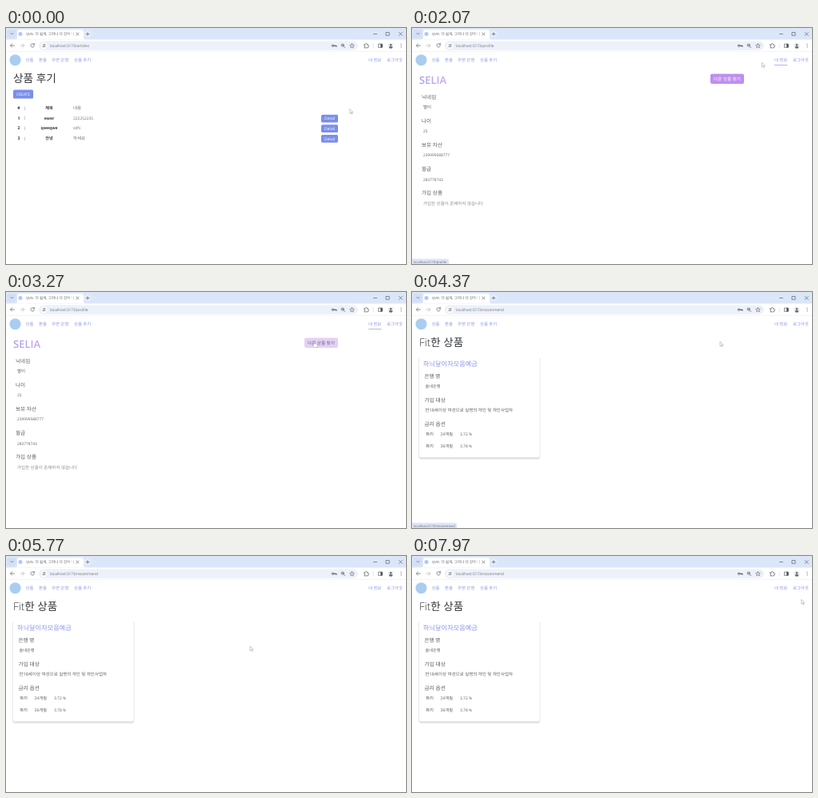
These frames come from a looping animation (500x296 px, 8000 ms). An HTML page:

```html
<!DOCTYPE html>
<html>
<head>
<meta charset="utf-8">
<style>
  html, body { margin: 0; width: 100%; height: 100%; overflow: hidden; background: #fff; }
  svg { display: block; width: 500px; height: 296px; }
  text { font-family: "Open Sans", "Noto Sans CJK KR", "Noto Sans CJK", sans-serif; text-rendering: geometricPrecision; white-space: pre; }
  .line { fill: none; stroke: #5d6268; stroke-width: .7; stroke-linecap: round; stroke-linejoin: round; }
</style>
</head>
<body>
<svg viewBox="0 0 500 296">
  <defs>
    <linearGradient id="nameFill"><stop stop-color="#ada1e7"/><stop offset="1" stop-color="#caa9ee"/></linearGradient>
    <linearGradient id="tabFade"><stop stop-color="#fff" stop-opacity="0"/><stop offset="1" stop-color="#fff"/></linearGradient>
  </defs>

  <g id="browser">
    <rect width="500" height="14.5" fill="#dce6f9"/>
    <rect x="1.5" y="2" width="11" height="10.5" rx="3" fill="#d3dff5"/>
    <path d="M11 14.5q3 0 3-3V5q0-3 3-3H94q3 0 3 3v6.500q0 3 3 3z" fill="#fff"/>
    <circle cx="18" cy="7.500" r="2.500" fill="#a9cdf0"/>
    <circle cx="102" cy="7.500" r="4.500" fill="#e6eefb"/>
    <g id="tabTitle"></g>
    <rect x="77" y="3" width="7" height="10" fill="url(#tabFade)"/>
    <path class="line" d="M6 6.500l1.500 1.500l1.500-1.500M87.900 6l3 3m0-3l-3 3M100 7.500h4m-2-2v4M459.500 7.500h4M475.300 5.500h3.800v3.800h-3.800zM491.300 5.500l4 4m0-4l-4 4"/>
    <rect x="41" y="16.500" width="399" height="11.500" rx="5.700" fill="#edf1fa"/>
    <path class="line" d="M10.500 22h-5m2.200-2.200l-2.200 2.200l2.200 2.200M35.200 20.600a2.300 2.300 0 1 0 .2 2M35.400 19.300v1.700h-1.700"/>
    <path class="line" style="stroke:#b3b7bc" d="M17.800 22h5m-2.200-2.200l2.200 2.200l-2.200 2.200"/>
    <circle cx="47.500" cy="22.200" r="3.700" fill="#fff"/>
    <path class="line" style="stroke-width:.5" d="M45.600 21.100h1.500m1.300 0h1.200M45.600 23.300h.9m1.400 0h1.700"/>
    <circle cx="47.800" cy="21.100" r=".6" class="line" style="stroke-width:.5"/>
    <circle cx="47" cy="23.300" r=".6" class="line" style="stroke-width:.5"/>
    <circle cx="408.600" cy="22.200" r="1.200" class="line" style="stroke-width:1"/>
    <path class="line" style="stroke-width:1" d="M410 22.200h3.200v1.100m-1.500-1v.7"/>
    <circle cx="420.800" cy="21.600" r="1.700" class="line"/>
    <path class="line" d="M422.100 23l1.700 1.700M420 21.600h1.600"/>
    <path class="line" style="stroke-width:.6" d="M432.500 19.500l.8 1.800l2 .2l-1.500 1.300l.5 2l-1.800-1.100l-1.800 1.100l.5-2l-1.500-1.300l2-.2z"/>
    <path class="line" d="M448 20.600h1.500q0-1.300.8-1.300t.8 1.300h1.400v1.500q1.200 0 1.200.7t-1.200.7v1.400h-4.500v-1.400q1 0 1-.7t-1-.7z"/>
    <path d="M459 19v6.500" stroke="#d3e0f7" stroke-width=".7"/>
    <path class="line" d="M465.800 20h4.600v4.400h-4.600z"/>
    <path d="M468.200 20h2.200v4.400h-2.200z" fill="#4c5157"/>
    <circle cx="481" cy="22.200" r="3.600" fill="#eaebec"/>
    <path d="M478.600 24.800q.4-2 2.400-2t2.400 2q-2.400 1.800-4.800 0z" fill="#6b6e72"/>
    <circle cx="481" cy="21.200" r="1.300" fill="#6b6e72"/>
    <path d="M494 20v.1m0 1.900v.1m0 1.900v.1" class="line" style="stroke-width:1"/>
    <path d="M0 29.500H500" stroke="#ebedf0" stroke-width=".6"/>
  </g>

  <g id="nav"><circle cx="11.500" cy="40.200" r="7" fill="#a9cdf0"/></g>
  <path id="underline" d="M453 46.500h16.300" stroke="#98a4ef" stroke-width=".8"/>
  <g id="articles"></g>
  <g id="profile">
    <rect x="373" y="57.500" width="42" height="12.500" rx="2" id="findButton"/>
  </g>
  <g id="recommend">
    <rect x="8.500" y="190" width="151.500" height="20" rx="2.500" fill="#e6e6e6"/>
    <path d="M8.500 82.500V204.500q0 3 3 3H157q3 0 3-3V82.500z" fill="#fff"/>
    <path d="M8.500 82.500V205q0 2.500 2.500 2.500H157.500q2.500 0 2.500-2.500V82.500" fill="none" stroke="#e0e0e0" stroke-width=".7"/>
  </g>
  <g id="status">
    <path id="statusBox" fill="#dde4f5"/>
  </g>
  <g id="cursor">
    <path id="arrow" d="M0 0V5.700L1.400 4.500L2.300 6.600L3.200 6.200L2.300 4.200H4.100Z" fill="#fff" stroke="#8f9296" stroke-width=".5"/>
    <path id="hand" d="M-.6.600Q0-.4.600.600V3Q1.500 2.500 2 3.200Q2.800 2.800 3.200 3.500Q4 3.400 4 4.300V5.600Q3.700 7.500 2.800 7.700H.3Q-.8 6.800-2 4.700Q-1.700 3.700-.6 4.700Z" fill="#fff" stroke="#8f9296" stroke-width=".5"/>
  </g>
</svg>
<script>
const $ = id => document.getElementById(id);
const INK = '#5a5e63', DARK = '#33373b', BLUE = '#8995ed';

function add(parent, tag, attrs, content = '') {
  const node = document.createElementNS('http://www.w3.org/2000/svg', tag);
  for (const key in attrs) node.setAttribute(key, attrs[key]);
  node.textContent = content;
  return $(parent).appendChild(node);
}
const label = (parent, content, x, y, size = 5.4, fill = INK, extra = {}) =>
  add(parent, 'text', { x, y, 'font-size': size, fill, ...extra }, content);
const heading = (parent, content, size) =>
  label(parent, content, 9, 68, size, DARK, { 'font-weight': 300 });
const centered = { 'text-anchor': 'middle' };
const bold = { ...centered, 'font-weight': 700 };

function button(parent, content, x, y, width, height) {
  add(parent, 'rect', { x, y, width, height, rx: 1.6, fill: '#7b8eea' });
  label(parent, content, x + width / 2, y + height / 2 + 1.8, 4.9, '#fff', centered);
}

// Browser and navigation
label('tabTitle', 'QVN', 25, 9.4, 4.3);
label('tabTitle', '더 쉽게, 그러나 더 강하게', 36.5, 9.4, 4.6);
const url = label('browser', '', 55, 24, 4.7, '#6b6f75');
[['상품', 24.5], ['환율', 41], ['주변 은행', 57], ['상품 후기', 85], ['내 정보', 453], ['로그아웃', 476]]
  .forEach(([name, x]) => label('nav', name, x, 42.2, 5.4, BLUE));

// Articles
heading('articles', '상품 후기', 13.7);
button('articles', 'CREATE', 9, 77.5, 25, 11);
[['#', '제목', '내용'], ['1', 'ewer', '222252235'], ['2', 'qweqwe', 'sdfs'], ['3', '안녕', '하세요']]
  .forEach(([number, title, content], i) => {
    const y = 102 + i * 12.6;
    label('articles', number, 16, y, 5.2, DARK, bold);
    label('articles', '|', 23.5, y - .3, 4.5, INK, centered);
    label('articles', title, 54, y, 5.1, DARK, bold);
    label('articles', content, 84, y, i < 3 && i ? 4.9 : 5.4, '#6c7075');
    if (i) button('articles', 'Detail', 394, y - 5.9, 21, 9.8);
  });

// Profile
label('profile', 'SELIA', 9, 70.2, 13, 'url(#nameFill)', { 'font-weight': 600 });
const findText = label('profile', '다른 상품 찾기', 394, 65.7, 5.6, '#fff', centered);
[['닉네임', '별이'], ['나이', '25'], ['보유 자산', '239999588777'], ['월급', '283778743'],
 ['가입 상품', '가입한 상품이 존재하지 않습니다']].forEach(([name, value], i) => {
  const y = 88.6 + i * 30.2;
  label('profile', name, 12, y, 6.6);
  label('profile', value, 14, y + 12.4, /^\d/.test(value) ? 4.8 : 5.5, i < 4 ? INK : '#8a8d92');
});

// Recommendation
heading('recommend', 'Fit한 상품', 13.5);
label('recommend', '하늬달이자모음예금', 14, 92.7, 8.2, BLUE);
label('recommend', '은행 명', 15.5, 107.8, 6.6);
label('recommend', '솔내은행', 16.5, 119.8, 5.2);
label('recommend', '가입 대상', 15.5, 137.8, 6.7);
label('recommend', '만18세이상 여성으로 실명의 개인 및 개인사업자', 16.5, 150, 5.5);
label('recommend', '금리 옵션', 15.5, 168.4, 6.7);
[['24개월', '3.72 %'], ['36개월', '3.78 %']].forEach(([term, rate], i) => {
  const y = 180.2 + i * 15;
  label('recommend', '복리', 17, y);
  label('recommend', term, 35.5, y, 5.2);
  label('recommend', rate, 60, y, 4.9);
});
const statusText = label('status', '', 2, 294.6, 4.05, '#646a75');

// Pointer tip: time, x, y
const path = [
  [0, 429.8, 101.5], [70, 429.8, 101.5], [270, 432, 112], [470, 434, 108], [670, 434, 108],
  [1070, 449, 60], [1270, 457, 41], [1370, 457, 40.5], [1870, 457, 40.5], [2070, 437.3, 43.3],
  [2670, 397, 54], [2770, 397, 54], [3170, 385.2, 62], [4970, 385, 62.3], [5270, 346, 88],
  [5570, 314.5, 112], [5670, 314.5, 112], [5870, 295.5, 114], [7270, 295.5, 114],
  [7470, 311, 122.5], [7670, 410, 98], [7870, 489, 58], [7970, 486.8, 54.5], [8000, 486.8, 54.5]
];
const clamp = v => Math.max(0, Math.min(1, v));
const ramp = (t, from, to) => clamp((t - from) / (to - from));
const mix = (a, b, p) => `rgb(${a.map((v, i) => v + (b[i] - v) * p)})`;

function pointerAt(t) {
  const i = path.findIndex(key => key[0] >= t) || 1;
  const [a, b] = [path[i - 1], path[i]];
  const p = ramp(t, a[0], b[0]);
  return [a[1] + (b[1] - a[1]) * p, a[2] + (b[2] - a[2]) * p];
}

function draw(now) {
  const t = Math.max(0, Math.floor((now % 8000 - 70) / 100) * 100 + 70);
  const page = t < 1470 ? 'articles' : t < 4370 ? 'profile' : 'recommend';
  for (const id of ['articles', 'profile', 'recommend']) $(id).style.display = id === page ? '' : 'none';
  url.textContent = 'localhost:5173/' + page;
  $('underline').style.opacity = t >= 1270 && t < 4370 ? 1 : 0;

  const hover = ramp(t, 2970, 3270);
  $('findButton').setAttribute('fill', mix([190, 142, 240], [227, 209, 247], hover));
  findText.setAttribute('fill', mix([255, 255, 255], [108, 100, 120], hover));

  const late = t > 3000;
  statusText.textContent = 'localhost:5173/' + (late ? 'recommend' : 'profile');
  $('statusBox').setAttribute('d', `M0 289.5H${late ? 54 : 44}q2 0 2 2V296H0z`);
  $('status').style.opacity = late
    ? ramp(t, 3270, 3470) * (1 - ramp(t, 4570, 4870))
    : ramp(t, 1270, 1470) * (1 - ramp(t, 2370, 2670));

  const hand = t >= 1270 && t < 1970 || t >= 3070 && t < 4370;
  $('hand').style.display = hand ? '' : 'none';
  $('arrow').style.display = hand ? 'none' : '';
  $('cursor').setAttribute('transform', `translate(${pointerAt(t)})`);
  requestAnimationFrame(draw);
}
draw(performance.now());
</script>
</body>
</html>
```
